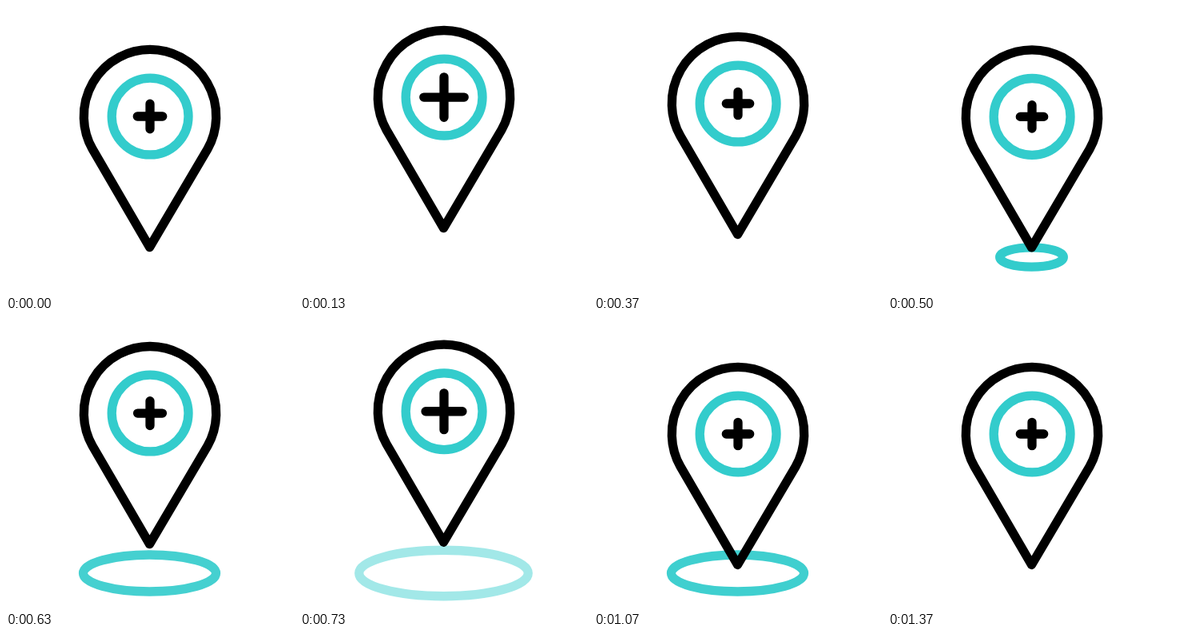
These frames come from a looping animation (360x360 px, 1.67 s). An HTML page:

```html
<!DOCTYPE html>
<html lang="en">
<head>
<meta charset="utf-8">
<style>
  html, body { margin: 0; width: 100%; height: 100%; overflow: hidden; background: #fff; }
  svg { display: block; width: 100%; height: 100%; fill: none; stroke: #000; stroke-width: 11.3; stroke-linecap: round; stroke-linejoin: round; }
  .accent { stroke: #33cccc; }
</style>
</head>
<body>
<svg viewBox="0 0 360 360">
  <ellipse id="ripple" class="accent" cx="179.5" cy="314"/>
  <g id="pin">
    <path d="M179.5 303.5L108 180.7A82.7 83.3 0 1 1 252 180.7Z"/>
    <circle class="accent" cx="180.1" cy="140" r="47.9"/>
    <path id="plus"/>
  </g>
</svg>
<script>
  const LOOP = 1670, FPS = 30, LAST_STEP = 41;
  const [ripple, pin, plus] = ['ripple', 'pin', 'plus'].map(id => document.getElementById(id));

  const clamp = x => Math.min(1, Math.max(0, x));
  const ramp = (k, from, to) => clamp((k - from) / (to - from));
  const ease = (k, from, to) => (1 - Math.cos(Math.PI * ramp(k, from, to))) / 2;
  // Eased rise from start to peak, then eased fall back to zero at end
  const hump = (k, start, peak, end) => k < peak ? ease(k, start, peak) : 1 - ease(k, peak, end);

  function drawRipple(k) {
    const second = k >= 24.5;
    const start = second ? 24 : 11;
    const fadeEnd = second ? 41 : 25;
    const rx = 111.5 * ease(k, start - 2.4, start + 13.3);
    const opacity = ramp(k, start, start + 4) * (1 - ramp(k, start + 7.4, fadeEnd));
    ripple.setAttribute('rx', rx);
    ripple.setAttribute('ry', 2 + rx * 0.253);
    ripple.setAttribute('opacity', opacity);
  }

  function draw(time) {
    const k = Math.min(LAST_STEP, Math.floor((time % LOOP + 4) * FPS / 1000));
    const lift = 42 * hump(k, -1.28, 7.9, 13.58) + 31 * hump(k, 14, 20.8, 27.05);
    const arm = 14.7 + 11 * (hump(k, -1.2, 4.8, 10.8) + hump(k, 18, 24, 30));
    pin.setAttribute('transform', `translate(0 ${-lift})`);
    plus.setAttribute('d', `M${180 - arm} 140h${2 * arm}M180 ${140 - arm}v${2 * arm}`);
    drawRipple(k);
  }

  const origin = performance.now();
  function tick() {
    draw(performance.now() - origin);
    requestAnimationFrame(tick);
  }
  tick();
</script>
</body>
</html>
```
